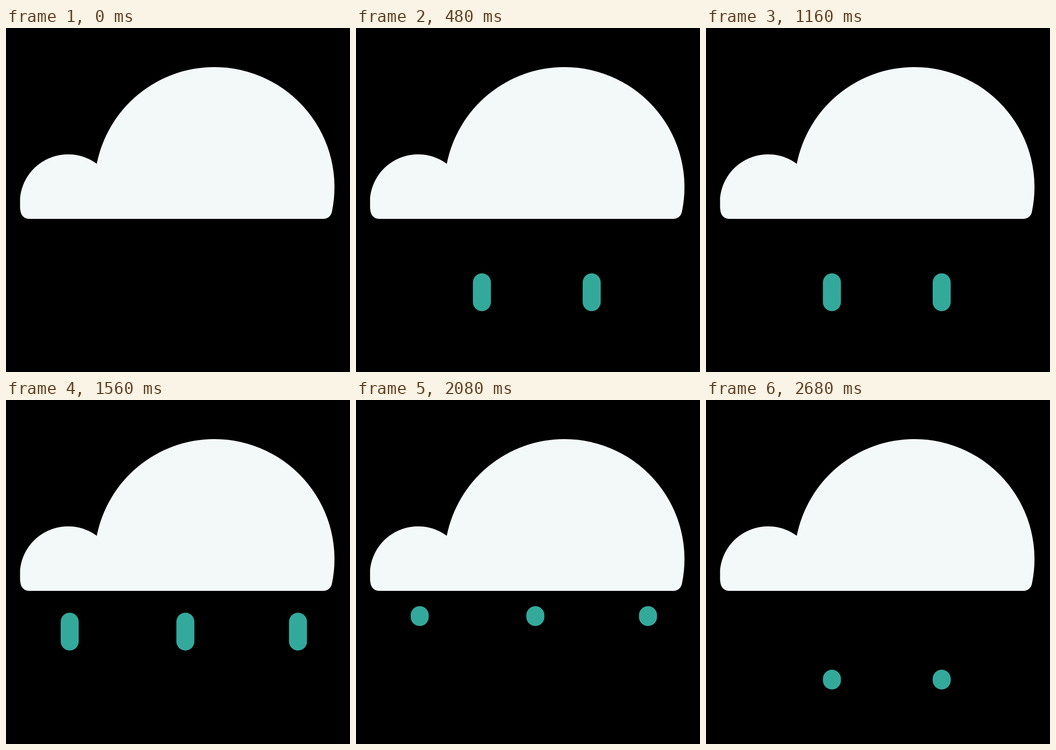
An HTML page that plays this animation: 748x748 px, repeating every 2.72 s.

```html
<!DOCTYPE html>
<html lang="en">
<head>
<meta charset="utf-8">
<title>Rain cloud</title>
<style>
  @property --head { syntax: "<length>"; inherits: true; initial-value: 0px; }
  @property --tail { syntax: "<length>"; inherits: true; initial-value: 0px; }

  html, body { margin: 0; width: 100%; height: 100%; overflow: hidden; background: #000; }
  svg { display: block; width: 100%; height: 100%; }
  .cloud { fill: #f3f9f9; }

  .row {
    fill: #33a99c;
    animation: head 680ms infinite, tail 680ms infinite, show 680ms step-end infinite;
  }
  .lower { animation-delay: -400ms; }
  .row rect {
    width: 39.2px;
    rx: 19.6px;
    y: calc(448.2px + var(--tail));
    height: calc(39.2px + var(--head) - var(--tail));
  }

  /* The head falls for 280 ms, the tail follows 120 ms later. */
  @keyframes head {
    0% { --head: 0px; animation-timing-function: cubic-bezier(.3333, 0, .6667, 1); }
    41.1765%, 100% { --head: 71px; }
  }
  @keyframes tail {
    0% { --tail: 0px; }
    17.6471% { --tail: 0px; animation-timing-function: cubic-bezier(.3333, 0, .6667, 1); }
    58.8235%, 100% { --tail: 71px; }
  }
  @keyframes show {
    0% { opacity: 0; }
    5.5% { opacity: 1; }
    58.6%, 100% { opacity: 0; }
  }
</style>
</head>
<body>
<svg viewBox="0 0 748 748">
  <path class="cloud" d="M50.5 415C41.5 415 33.8 409 31.9 400A105 105 0 0 1 30.6 391V369.1
    A105 105 0 0 1 197.4 295.2A261 261 0 0 1 453.3 85A261 261 0 0 1 708.6 400
    C706.6 409 699 415 690 415Z"/>
  <g class="row upper">
    <rect x="118.9"/>
    <rect x="370.4"/>
    <rect x="615.3"/>
  </g>
  <g transform="translate(0 71)">
    <g class="row lower">
      <rect x="254.2"/>
      <rect x="492.9"/>
    </g>
  </g>
</svg>
</body>
</html>
```
